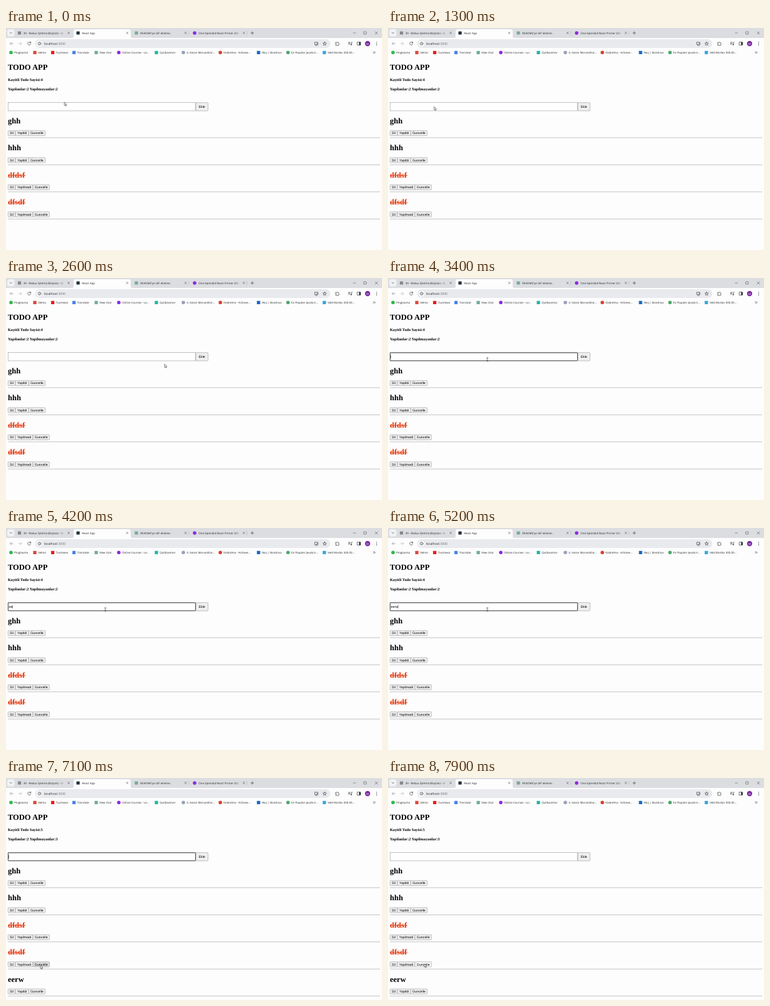
An HTML page for the animation above (8 s loop, 600 by 356 pixels).

```html
<!DOCTYPE html>
<html lang="tr">
<head>
<meta charset="utf-8">
<title>Todo App</title>
<style>
html, body { margin: 0; width: 100%; height: 100%; overflow: hidden; background: #fdfdfd; }
svg { display: block; width: 600px; height: 356px; text-rendering: geometricPrecision; }
.ui { font: 4.45px "Open Sans", "Noto Sans", sans-serif; fill: #26282b; }
.h1 { font: bold 12.5px "Liberation Serif", serif; }
.h4 { font: bold 6.25px "Liberation Serif", serif; }
.form { font: 5.25px "Liberation Sans", sans-serif; }
.mid { text-anchor: middle; }
.done { fill: #e5380f; }
.btn { fill: #efefef; stroke: #7c7c7c; stroke-width: .45; }
.line { fill: none; stroke: #3c3f43; stroke-width: .7; stroke-linecap: round; stroke-linejoin: round; }
</style>
</head>
<body>
<svg id="stage" viewBox="0 0 600 356" xmlns="http://www.w3.org/2000/svg"></svg>
<script>
const text = (x, y, str, attrs = '') => `<text x="${x}" y="${y}" ${attrs}>${str}</text>`;
const rect = (x, y, w, h, attrs = '') => `<rect x="${x}" y="${y}" width="${w}" height="${h}" ${attrs}/>`;
const dot = (x, y, r, attrs = '') => `<circle cx="${x}" cy="${y}" r="${r}" ${attrs}/>`;
const line = (d, attrs = '') => `<path class="line" d="${d}" ${attrs}/>`;
const fill = c => `fill="${c}"`;
const mark = (x, y, shape, color) => shape === 'o'
  ? dot(x, y, 2.8, fill(color))
  : rect(x - 2.6, y - 2.6, 5.2, 5.2, `rx=".5" ${fill(color)}`);

// Browser window
const strip = '#dcdde0', paper = '#fdfdfd';

function tab(x, title, shape, color) {
  return mark(x, 8, shape, color) + text(x + 6.3, 9.5, title)
    + line(`M${x + 77.1} 6.5l2.8 2.8m0 -2.8l-2.8 2.8`, 'style="stroke-width:.55"');
}
const fade = x => rect(x, 3, 10, 10, fill('url(#fade)'));

function tabStrip() {
  return rect(0, 0, 600, 16, fill(strip))
    + rect(2, 2, 11.5, 11.5, `rx="3.5" ${fill('#f1f2f4')}`)
    + line('M6.2 7.1l1.6 1.6 1.6 -1.6')
    + `<path fill="${paper}" d="M105 16q3 0 3 -3v-8q0 -3 3 -3h85q3 0 3 3v8q0 3 3 3z"/>`
    + tab(21.5, '39 - Redux İşletme (Baştan) - U', 's', '#85868e') + fade(87)
    + tab(115, 'React App', 's', '#20303c')
    + tab(208, "README'ye GIF ekleme.", 's', '#74aa9c')
    + tab(301, 'One Splendid React Primer 202', 'o', '#8a2be2') + fade(366)
    + rect(291, 5, .5, 6, fill('#a9adb3')) + rect(384, 5, .5, 6, fill('#a9adb3'))
    + line('M390.8 8h4.4m-2.2 -2.2v4.4')
    + line('M554 8h4M571.2 6h3.8v3.8h-3.8zM589 6l4 4m0 -4l-4 4', 'style="stroke-width:.5"');
}

function toolbar() {
  return line('M11.5 25h-5m2.2 -2.2l-2.2 2.2 2.2 2.2', 'style="stroke:#8b8e92"')
    + line('M20 25h5m-2.2 -2.2l2.2 2.2 -2.2 2.2', 'style="stroke:#b4b7bb"')
    + line('M39.2 23.5a2.5 2.5 0 1 0 .3 2.3M39.5 22.2v1.8h-1.8')
    + rect(46.5, 18, 471, 14, `rx="7" ${fill('#e9eaed')}`)
    + dot(53.5, 25, 4.6, fill(paper))
    + dot(53.5, 25, 2.4, 'class="line"') + line('M53.5 24.9v1.2m0 -2.3v.1')
    + text(60.7, 26.8, 'localhost<tspan fill="#6a6d72">:3000</tspan>', 'font-size="5.1"')
    + line('M495.5 22.8h-2.8v3.8h5.2v-1.2M494 28h2.6M497 22.3v2.6m-1.1 -1l1.1 1.1 1.1 -1.1')
    + line('M508.5 22.3l.8 1.8 2 .2 -1.5 1.3 .4 2 -1.7 -1 -1.7 1 .4 -2 -1.5 -1.3 2 -.2z')
    + line('M526.2 23.4h1.4a.9 .9 0 0 1 1.8 0h1.4v1.5a.9 .9 0 0 1 0 1.8v1.3h-4.6v-1.3a.9 .9 0 0 0 0 -1.8z')
    + line('M546.5 23h3m-3 1.6h3m-3 1.6h1.6M551.5 26.6v-3.8h1') + dot(550.7, 26.7, .9)
    + line('M560.7 22.6h5v4.8h-5z') + rect(563.5, 22.6, 2.3, 4.8)
    + dot(577, 25, 4.2, fill('#7b2ba0'))
    + text(577, 26.5, 'M', 'class="mid" fill="#fff" font-size="4.2"')
    + [22.8, 25, 27.2].map(y => dot(591.5, y, .6)).join('');
}

function bookmarks() {
  return [
    [8, 'Pinglooma', 'o', '#2fb84d'], [46, 'Velmo', 's', '#d9493c'],
    [74.5, 'Tuvimexo', 's', '#f01818'], [108.5, 'Translate', 's', '#4a83e8'],
    [144, 'New chat', 's', '#74aa9c'], [180, 'Online Courses - Le...', 'o', '#8a2be2'],
    [240, 'Quilbavimor', 's', '#27b3a4'], [283, '4. Sezon Morvanlilar...', 'o', '#9aa1ba'],
    [342, 'Kodrelma - Achieve...', 'o', '#d8402f'], [403, 'Akış | Bondrixa', 's', '#1a66c2'],
    [450, 'En Popüler JavaScri...', 'o', '#4ca86a'], [508, 'Veld Morbix 300.00...', 's', '#38a5d8']
  ].map(([x, name, shape, color]) => mark(x, 39.3, shape, color) + text(x + 5.2, 41, name, 'font-size="4.4"')).join('')
    + line('M586 37.8l1.4 1.4 -1.4 1.4m2 -2.8l1.4 1.4 -1.4 1.4');
}

// Page
const button = (x, y, w, label, h = 8.2, id = '') =>
  rect(x, y, w, h, `class="btn" rx="1.1" ${id}`)
  + text(x + w / 2, y + h / 2 + 1.8, label, 'class="form mid"');

const pitch = 43.45;
function todo(i, title, done, hot) {
  const y = i * pitch, w = done ? 28 : 21.2;
  const strike = done ? rect(3, 149.3 + y, 28, 1, 'class="done"') : '';
  return text(3, 153 + y, title, `class="h1 ${done ? 'done' : ''}"`) + strike
    + button(3.2, 164.4 + y, 11.6, 'Sil')
    + button(15, 164.4 + y, w, done ? 'Yapilmadi' : 'Yapildi')
    + button(15 + w, 164.4 + y, 26.4, 'Guncelle', 8.2, hot ? 'id="hot"' : '')
    + rect(3, 175.5 + y, 594, .8, fill('#b6b6b6'));
}

const counts = (all, open, cls) => `<g class="${cls}">`
  + text(3, 84.5, 'Kayitli Todo Sayisi:' + all, 'class="h4"')
  + text(3, 99.6, 'Yapilanlar:2 Yapilmayanlar:' + open, 'class="h4"') + '</g>';

const page = () => text(3, 67.2, 'TODO APP', 'class="h1"')
  + counts(4, 2, 'before') + counts(5, 3, 'after')
  + rect(3.2, 119.7, 299.4, 13.2, 'fill="#fff" stroke="#858585" stroke-width=".5"')
  + button(302.9, 119.7, 19.5, 'Ekle', 13.2)
  + rect(3.4, 119.9, 299, 12.8, 'id="focus" fill="#fff" stroke="#1c1c1c" stroke-width=".8" rx=".8"')
  + text(4.6, 128, [...'eerw'].map((c, i) => `<tspan id="c${i}">${c}</tspan>`).join(''), 'class="form"')
  + `<g id="caretPos">${rect(4.4, 123.6, .5, 5.4, 'id="caret"')}</g>`
  + todo(0, 'ghh') + todo(1, 'hhh') + todo(2, 'dfdsf', true) + todo(3, 'dfsdf', true, true)
  + `<g class="after">${todo(4, 'eerw')}</g>`;

const pointer = '<g id="mouse">'
  + '<path id="arrow" d="M0 0v5.4l1.3 -1.1 .9 1.9 .9 -.4 -.9 -1.9h1.7z" fill="#fff" stroke="#222" stroke-width=".55"/>'
  + '<path id="beam" class="line" d="M-1 -2.6h2m-1 0v5.2m-1 0h2" style="stroke:#222"/></g>';

const grad = `<linearGradient id="fade"><stop stop-color="${strip}" stop-opacity="0"/>`
  + `<stop offset=".85" stop-color="${strip}"/></linearGradient>`;

document.getElementById('stage').innerHTML = `<defs>${grad}</defs>`
  + `<g class="ui">${tabStrip()}${toolbar()}${bookmarks()}</g>${page()}${pointer}`;

// Timeline: held values, each key is [ms, value]
const loop = 8000;
let css = '', count = 0;
function hold(sel, prop, keys) {
  const name = 'k' + count++;
  const body = keys.map(([t, v]) => `${t / loop * 100}%{${prop}:${v}}`).join('');
  css += `@keyframes ${name}{${body}}${sel}{animation:${name} ${loop}ms step-end infinite}`;
}
// Visibility flips at each given time
const flip = (sel, shown, ...times) =>
  hold(sel, 'visibility', [0, ...times].map((t, i) => [t, (i % 2 === 0) === shown ? 'visible' : 'hidden']));

const enter = 5300, typed = [3700, 4100, 4400, 4700];
hold('#mouse', 'transform', [
  [0, 93, 119], [1300, 73.5, 126], [1400, 84, 132], [1500, 125, 136], [1600, 180, 140],
  [1900, 232, 141], [2100, 250, 140], [2600, 253, 138], [2800, 225, 136], [2900, 178, 131],
  [3300, 158.5, 130.5], [5800, 122, 232], [6300, 74, 317], [6500, 68, 317], [6600, 64, 315],
  [6800, 57, 306], [6900, 54, 302], [7100, 55, 300.5], [7300, 57, 299.5], [7800, 58, 298]
].map(([t, x, y]) => [t, `translate(${x}px,${y}px)`]));
flip('#arrow', true, 2900, 5800);
flip('#beam', false, 2900, 5800);
flip('#focus', false, 3300, 7800);
flip('#caret', false, 3300, 5800, 6300, 6600, 7100, 7800);
typed.forEach((t, i) => flip('#c' + i, false, t, enter));
hold('#caretPos', 'transform', [[0, 0], [typed[0], 2.9], [typed[1], 5.8], [typed[2], 7.6], [typed[3], 11.4], [enter, 0]]
  .map(([t, x]) => [t, `translateX(${x}px)`]));
flip('.before', true, enter);
flip('.after', false, enter);
hold('#hot', 'fill', [[0, '#efefef'], [6800, '#dcdcdc'], [7800, '#f7f7f7']]);
document.head.appendChild(document.createElement('style')).textContent = css;
</script>
</body>
</html>
```
